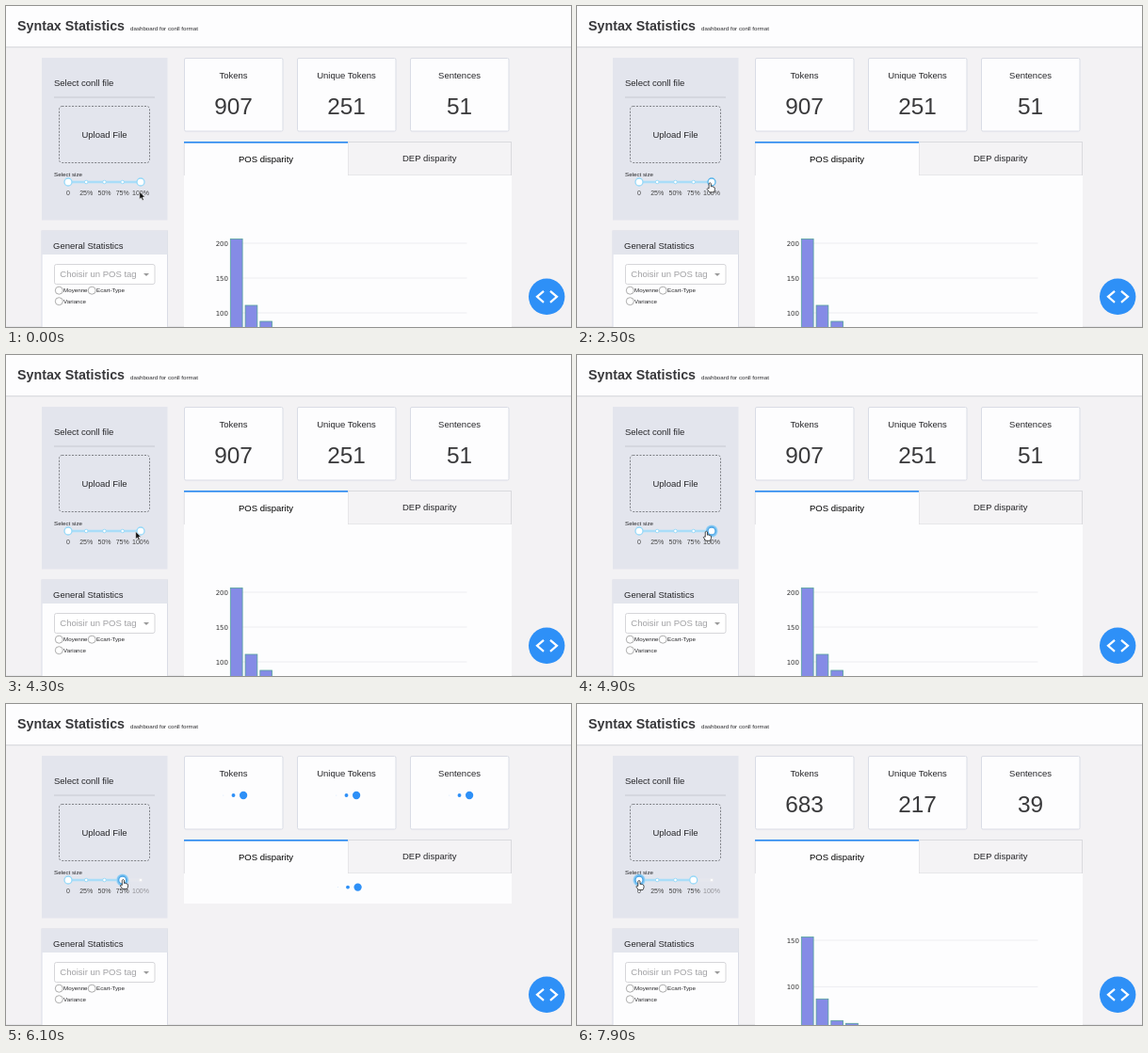
Recreate the animation shown at these times as an HTML page. Size 600 by 341 pixels, loop 8 s.

```html
<!DOCTYPE html>
<html lang="en">
<head>
<meta charset="utf-8">
<title>Syntax Statistics</title>
<style>
  html, body { margin: 0; width: 100%; height: 100%; overflow: hidden; background: #f3f2f4; }
  svg { display: block; width: 600px; height: 341px; }
  text { font-family: "Liberation Sans", Arial, sans-serif; font-size: 9.5px; fill: #262629; }
  .mid { text-anchor: middle; }
  .small { font-size: 6.2px; }
  .mark { font-size: 7px; text-anchor: middle; fill: #444; }
  .big { font-size: 24.4px; text-anchor: middle; fill: #3a3a3c; }
  .tick { font-family: "DejaVu Sans", Verdana, sans-serif; font-size: 7px; text-anchor: end; fill: #333; }
  .card { fill: #fdfdfe; stroke: #d9dce5; }
  .bar { fill: #858be6; stroke: #55a39c; stroke-width: .8; }
</style>
</head>
<body>
<svg id="stage" viewBox="0 0 600 341"></svg>
<script>
const LOOP = 8000, STEP = 100;
const stage = document.getElementById("stage");
const rect = (x, y, w, h, attrs) => `<rect x="${x}" y="${y}" width="${w}" height="${h}" ${attrs}/>`;
const circle = (x, y, r, attrs) => `<circle cx="${x}" cy="${y}" r="${r}" ${attrs}/>`;
const text = (x, y, s, cls = "", attrs = "") => `<text x="${x}" y="${y}" class="${cls}" ${attrs}>${s}</text>`;
const line = (x1, y1, x2, y2, color) => `<path d="M${x1} ${y1}L${x2} ${y2}" stroke="${color}"/>`;

const stops = [66, 85.2, 104.5, 123.7, 143];
const cards = [["Tokens", 241.5], ["Unique Tokens", 361.5], ["Sentences", 481.5]];
const full = {
  counts: [907, 251, 51], ticks: [[200, 252], [150, 289], [100, 326]], tops: [247.5, 318, 335]
};
const reduced = {
  counts: [683, 217, 39], ticks: [[150, 251], [100, 300.3]], tops: [247.5, 313.3, 336.3, 339.3]
};

function header() {
  return rect(0, 0, 600, 43, 'fill="#fdfdfe"') + line(0, 43.5, 600, 43.5, "#dcdce0") +
    line(0, 44.5, 600, 44.5, "#ececef") +
    text(12, 26, "Syntax Statistics", "", 'style="font-size:14.25px;font-weight:bold;fill:#38383b"') +
    text(132, 26.2, "dashboard for conll format", "small");
}

function sidebar() {
  const radio = (x, y, label) =>
    circle(x, y, 4, 'fill="#fff" stroke="#999" stroke-width=".8"') + text(x + 4.8, y + 2.2, label, "small");
  return rect(38, 55, 133.5, 172.5, 'fill="#e3e5ed"') +
    text(51, 85, "Select conll file") + line(51, 97, 158, 97, "#c6c8d0") +
    rect(56.5, 106.5, 96, 60, 'rx="3" fill="none" stroke="#66676d" stroke-width=".8" stroke-dasharray="2 1.5"') +
    text(104.5, 140, "Upload File", "mid") + text(51, 180.5, "Select size", "small") +
    rect(38, 239, 133.5, 110, 'class="card"') + rect(38, 239, 133.5, 25, 'fill="#e3e5ed"') +
    text(50, 257.6, "General Statistics") +
    rect(51.5, 274.5, 106.5, 21, 'rx="2" fill="#fff" stroke="#ccccd0" stroke-width=".8"') +
    text(57.3, 288.2, "Choisir un POS tag", "", 'style="fill:#a0a0a3"') +
    '<path d="M146 284h6l-3 3z" fill="#999"/>' +
    radio(56.3, 302.2, "Moyenne") + radio(91.2, 302.2, "Ecart-Type") + radio(56.3, 313.7, "Variance");
}

function tabs() {
  return rect(363, 144.5, 173.5, 35.5, 'fill="#f4f3f5" stroke="#d8d8dc" stroke-width=".9"') +
    rect(189, 144, 174, 36.5, 'fill="#fdfdfe"') + rect(189, 144, 174, 1.7, 'fill="#2f8cf0"') +
    line(189.3, 146, 189.3, 180, "#e0e0e4") +
    text(276, 165.6, "POS disparity", "mid", 'style="fill:#000"') +
    text(449.7, 165.4, "DEP disparity", "mid");
}

const button = circle(574.2, 308.8, 19.2, 'fill="#2e90f7"') +
  '<path d="M571 302.8l-7 6 7 6M578 302.8l7 6-7 6" fill="none" stroke="#fff" stroke-width="2.2"/>';

const page = rect(0, 0, 600, 341, 'fill="#f3f2f4"') + rect(0, 340, 600, 1, 'fill="#e6e6e9"') +
  header() + sidebar() +
  cards.map(([name, x]) => rect(x - 52, 55.5, 104.5, 77.5, 'rx="1.5" class="card"') +
    text(x, 77, name, "mid")).join("") + tabs();

function chart(data) {
  return rect(189, 180, 348, 161, 'fill="#fdfdfe"') +
    data.ticks.map(([n, y]) => line(238, y, 489.5, y, "#ededf1") + text(236, y + 2.6, n, "tick")).join("") +
    data.tops.map((y, i) => rect(238.3 + i * 15.75, y, 12.8, 350 - y, 'class="bar"')).join("") +
    data.counts.map((n, i) => text(cards[i][1], 114.6, n, "big")).join("");
}

const ease = p => p * p * (3 - 2 * p);

// Three dots bounce in turn, each 160 ms after the one before.
function spinner(x, y, t) {
  return [0, 1, 2].map(i => {
    const p = (t - 5050 - i * 160) / 560;
    const s = p < 0 || p > 2 ? 0 : ease(p < 1 ? p : 2 - p);
    return circle(x + (i - 1) * 10.6, y, 5.3 * s, 'fill="#2e90f7"');
  }).join("");
}

function loading(t) {
  return rect(189, 180, 348, 32, 'fill="#fdfdfe"') + spinner(363, 194.6, t) +
    cards.map(([, x]) => spinner(x, 97, t)).join("");
}

function slider(end, focus, hover) {
  const knob = (i) => {
    const x = stops[i], on = focus === i;
    const edge = on ? "#4aa5e6" : hover === i ? "#57b4ea" : "#96d8f8";
    return (on ? circle(x, 187, 6.6, 'fill="#a5d8f7"') + circle(x, 187, 5.9, 'fill="#7fc3f0"') : "") +
      circle(x, 187, 4, `fill="#fff" stroke="${edge}" stroke-width="1.3"`);
  };
  return rect(66, 185.7, 77, 2.6, 'fill="#e6e7ed"') +
    rect(66, 185.7, stops[end] - 66, 2.6, 'fill="#a9ddf8"') +
    stops.map((x, i) =>
      circle(x, 187, 1.8, `fill="#fff" stroke="${i > end ? "#e9e9ec" : "#96d8f8"}" stroke-width=".9"`) +
      text(x, 200.6, i ? i * 25 + "%" : "0", "mark", i > end ? 'style="fill:#949499"' : "")).join("") +
    knob(0) + knob(end);
}

// Pointer path: time, x, y
const path = [
  [0, 141.8, 197.3], [900, 137.7, 187.5], [2000, 137.7, 187.5], [2800, 143, 188],
  [3700, 143, 188], [4200, 137.7, 187.5], [4400, 137.7, 187.5], [4700, 142, 187.5],
  [5300, 124.5, 186.5], [6900, 124.5, 186.5], [7700, 66, 187.5], [LOOP, 66, 187.5]
];

function pointerAt(t) {
  const i = path.findIndex(k => k[0] > t), [t0, x0, y0] = path[i - 1], [t1, x1, y1] = path[i];
  const p = ease((t - t0) / (t1 - t0));
  return [x0 + (x1 - x0) * p, y0 + (y1 - y0) * p];
}

function pointer(x, y, hand) {
  const d = hand
    ? "M-1.2 .7Q0-.7 1 .7V4Q2 3.2 2.6 4.2Q3.7 3.6 4.1 4.8Q5 4.6 5 5.7V7.5L4 10H-.7L-3.2 6.5Q-3-5-1.2 6Z"
        .replace("-3-5-1.2 6", "-2.6 5-1.2 6")
    : "M0 0V8L1.8 6.4L3.1 9.3L4.5 8.6L3.2 5.8H5.7Z";
  const look = hand ? 'fill="#fff" stroke="#222" stroke-width=".8"' : 'fill="#111" stroke="#fff" stroke-width=".5"';
  return `<path transform="translate(${x} ${y})" d="${d}" ${look}/>`;
}

function draw(t) {
  const [x, y] = pointerAt(t);
  const end = t < 5000 ? 4 : 3;
  const focus = t >= 7800 ? 0 : t >= 4700 ? end : -1;
  const hover = [0, end].find(i => Math.hypot(x - stops[i], y - 187) < 4.6);
  const dragging = t >= 4700 && t < 5500;
  const body = t >= 5500 && t < 6300 ? loading(t) : chart(t < 5500 ? full : reduced);
  stage.innerHTML = page + body + slider(end, focus, hover) + button +
    pointer(x, y, dragging || hover !== undefined);
}

let last = -1;
function tick() {
  const t = Math.floor(performance.now() % LOOP / STEP) * STEP;
  if (t !== last) draw(last = t);
  requestAnimationFrame(tick);
}
tick();
</script>
</body>
</html>
```
